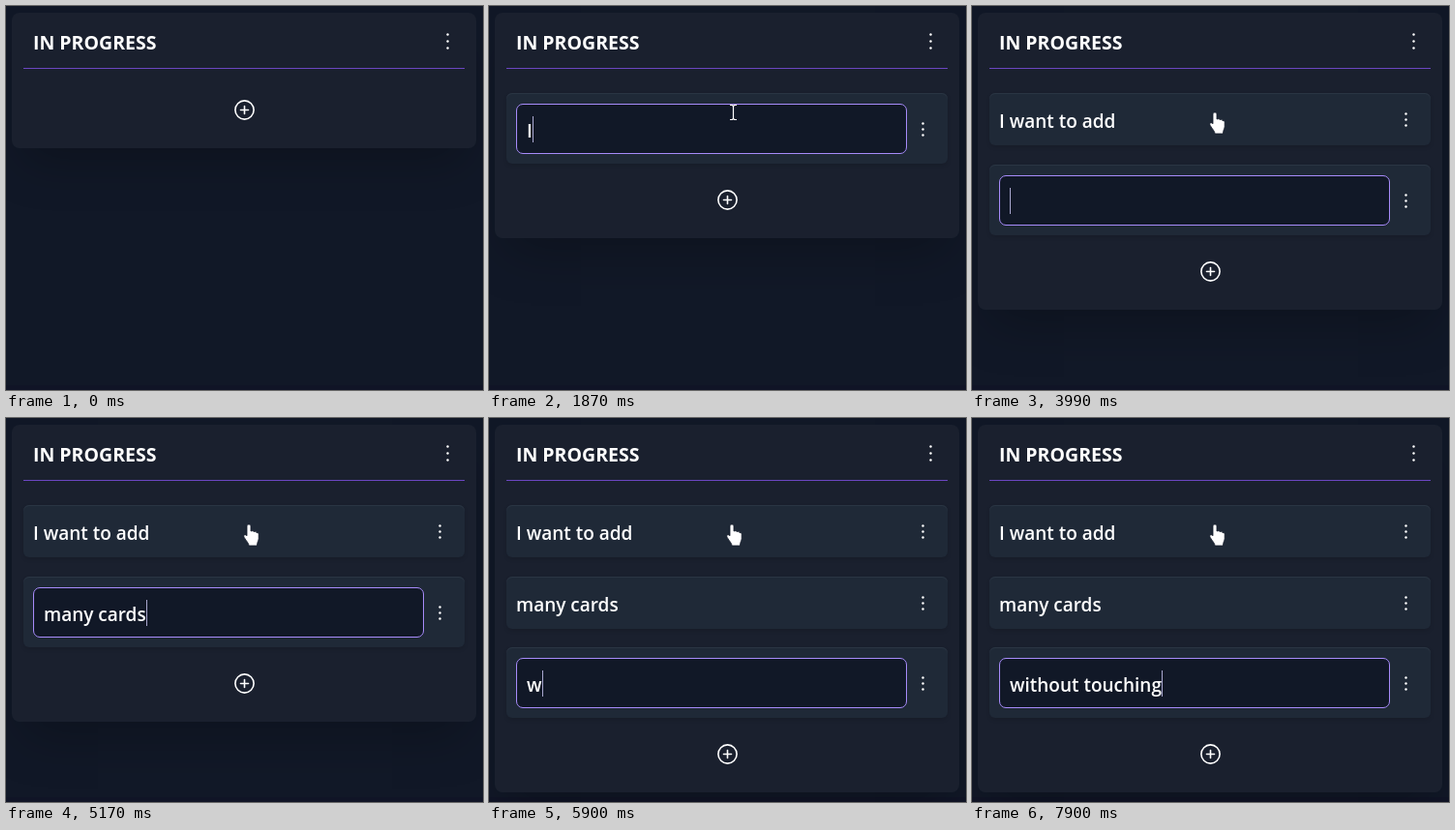
Write an HTML page that moves like this. It is 493 px wide and 397 px high and loops after 8 s.

```html
<!DOCTYPE html>
<html lang="en">
<head>
<meta charset="utf-8">
<title>Adding cards</title>
<style>
  html, body { margin: 0; width: 100%; height: 100%; overflow: hidden; background: #111827; }
  body { font: 600 19px "Open Sans", "Noto Sans", sans-serif; color: #fff; }
  div, h1, svg { position: absolute; box-sizing: border-box; }
  #floor { left: 0; right: 0; top: 392px; height: 5px; background: #101426; }
  #column { left: 6px; top: 7px; width: 480px; border-radius: 8px; background: #1a202e;
    box-shadow: 0 25px 50px -12px rgba(0, 0, 0, .25); }
  h1 { left: 28px; top: 24px; margin: 0; font-size: 19.5px; font-weight: 700; line-height: 27px; white-space: pre; }
  #rule { left: 18px; top: 64px; width: 456px; height: 1px; background: #6b46c1; }
  .card { left: 18px; width: 456px; border-radius: 6px; background: #1f2937;
    box-shadow: inset 0 1px #2a3543, 0 2px 4px rgba(0, 0, 0, .12); }
  .field { left: 10px; top: 0; bottom: 0; width: 404px; display: flex; align-items: center;
    white-space: pre; line-height: 26px; border-radius: 7px; }
  .editing .field { top: 11px; bottom: 10px; padding-left: 10px; border: 1px solid #a78bfa; background: #111827; }
  .field span { position: relative; top: 2px; }
  .field i { width: 1px; height: 27px; margin-top: 1px; background: #a9a7cf; }
  .card:not(.editing) i { display: none; }
  .dots { width: 3px; height: 3px; border-radius: 50%; background: #fff; transform: scale(.8);
    box-shadow: 0 -7.5px #fff, 0 7.5px #fff; }
  .card .dots { left: 429px; top: calc(50% - 1px); }
  #top-dots { left: 455px; top: 35px; box-shadow: 0 -8.8px #fff, 0 8.8px #fff; }
  svg { left: 0; top: 0; width: 493px; height: 397px; }
</style>
</head>
<body>
<div id="floor"></div>
<div id="column"></div>
<h1>IN PROGRESS</h1>
<div id="top-dots" class="dots"></div>
<div id="rule"></div>
<svg viewBox="0 0 493 397">
  <g id="plus" fill="none" stroke="#fff" stroke-width="1.6" stroke-linecap="round">
    <circle r="9.6"/>
    <path d="M-4 0H4M0-4V4"/>
  </g>
  <g id="pointer" stroke-linejoin="round">
    <path id="arrow" fill="#fff" stroke="#111827" stroke-width=".8" d="M0 0v16l3.8-3.6 2.6 6 2.4-1-2.6-5.8H11z"/>
    <path id="hand" fill="#fff" stroke="#111827" stroke-width=".8" d="M-3 2c0-2.6 4-2.6 4 0v5c2-.8 3 0 3.2.6 1.2-.6 2.5 0 2.8 1 1.3-.4 2.2.4 2.2 1.8v4c0 2.5-1.7 3.5-1.7 7.6H-1c0-2.6-2.5-4.5-4.8-8.6-1.4-2.6 1-3.6 2.8-1.6z"/>
    <path id="beam" fill="none" stroke="#fff" stroke-width="1.2" d="M-3-7.5H-.7L.5-6.5 1.7-7.5H4M.5-6.5V6.5M-3 7.5H-.7L.5 6.5 1.7 7.5H4"/>
  </g>
</svg>
<script>
const LOOP = 8000, FADE = 375, SLIDE = 250;
const EDIT_HEIGHT = 73, CARD_HEIGHT = 54;
const PLUS_Y = [107.5, 200.5, 274.5, 347.5];

// keys: the moment each character is typed
const cards = [
  { text: 'I want to add', start: 960, end: 3590, y: 90,
    keys: [1870, 2000, 2330, 2400, 2460, 2600, 2660, 2730, 2860, 2930, 3060, 3190, 3260] },
  { text: 'many cards', start: 3590, end: 5500, y: 164,
    keys: [4060, 4120, 4190, 4260, 4380, 4650, 4720, 4910, 5110, 5170] },
  { text: 'without touching', start: 5500, end: Infinity, y: 237,
    keys: [5900, 5960, 6030, 6160, 6300, 6360, 6500, 6560, 6760, 7030, 7160, 7500, 7600, 7700, 7800, 7900] },
];

const $ = id => document.getElementById(id);
const clamp = x => Math.max(0, Math.min(1, x));
const smooth = x => (x = clamp(x), x * x * (3 - 2 * x));
const mix = (a, b, p) => a + (b - a) * p;
const show = (el, on) => el.style.display = on ? '' : 'none';

for (const card of cards) {
  const el = card.el = document.createElement('div');
  el.innerHTML = '<div class="field"><span></span><i></i></div><div class="dots"></div>';
  card.label = el.querySelector('span');
  card.caret = el.querySelector('i');
  document.body.insertBefore(el, document.querySelector('svg'));
}

function drawCard(card, t) {
  const { el, label, caret, start, end, text, keys, y } = card;
  show(el, t >= start);
  const editing = t < end;
  const appear = Math.max(0, 2 * clamp((t - start) / FADE) ** 1.7 - 1);
  el.className = editing ? 'card editing' : 'card';
  el.style.top = y + 'px';
  el.style.height = (editing ? EDIT_HEIGHT : mix(EDIT_HEIGHT, CARD_HEIGHT, smooth((t - end) / SLIDE))) + 'px';
  el.style.opacity = appear;
  el.style.transform = appear < 1 ? `scale(${mix(.98, 1, appear)})` : '';
  label.textContent = text.slice(0, keys.filter(k => t >= k).length);
  caret.style.opacity = t >= 1600 && t < 1870 ? 0 : 1;
}

function drawPointer(t) {
  const p = smooth((t - 470) / 400);
  $('pointer').setAttribute('transform', `translate(${mix(300, 252, p)} ${mix(185, 110, p)})`);
  show($('pointer'), t >= 470);
  const shape = t < 800 ? 'arrow' : t < 960 || t >= 3590 ? 'hand' : 'beam';
  for (const id of ['arrow', 'hand', 'beam']) show($(id), id === shape);
}

function render(t) {
  cards.forEach(card => drawCard(card, t));
  const count = cards.filter(card => t >= card.start).length;
  const slide = count ? smooth((t - cards[count - 1].start) / SLIDE) : 1;
  const plusY = mix(PLUS_Y[Math.max(0, count - 1)], PLUS_Y[count], slide);
  $('plus').setAttribute('transform', `translate(246.5 ${plusY})`);
  $('column').style.height = Math.floor(PLUS_Y[count] + 32.5) + 'px';
  drawPointer(t);
}

const origin = performance.now();
function tick() {
  render((performance.now() - origin) % LOOP);
  requestAnimationFrame(tick);
}
tick();
</script>
</body>
</html>
```
